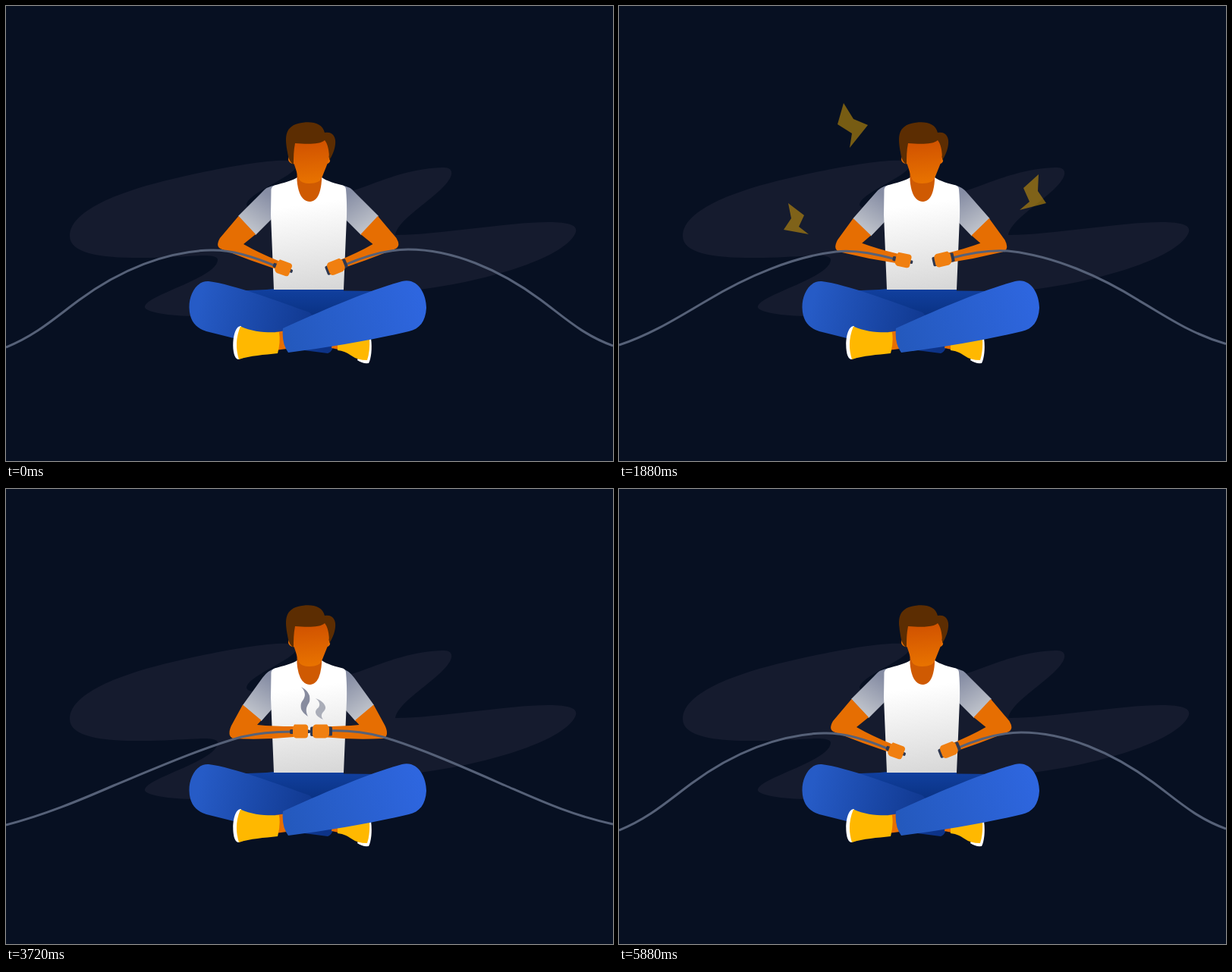
Recreate the animation shown at these times as an HTML page. Size 800 by 600 pixels, loop 6720 ms.

```html
<!DOCTYPE html>
<html lang="en">
<head>
<meta charset="utf-8">
<title>Connecting cables</title>
<style>
html, body { margin: 0; width: 100%; height: 100%; overflow: hidden; background: #071022; }
svg { display: block; width: 100vw; height: 100vh; }
.skin { fill: #e66e02; }
.fist { fill: #f07f10; }
.dark { fill: #2f3850; }
.gold { fill: #ffb800; }
.cable { fill: none; stroke: #566178; stroke-width: 3; }
</style>
</head>
<body>
<svg viewBox="0 0 800 600">
  <defs>
    <linearGradient id="shirt" gradientUnits="userSpaceOnUse" x1="392" y1="262" x2="408" y2="374">
      <stop stop-color="#fff"/><stop offset="1" stop-color="#d8d8d8"/>
    </linearGradient>
    <linearGradient id="sleeve" gradientUnits="userSpaceOnUse" x1="347" y1="248" x2="318" y2="292">
      <stop stop-color="#868da4"/><stop offset="1" stop-color="#bfc3cb"/>
    </linearGradient>
    <linearGradient id="face" gradientUnits="userSpaceOnUse" x1="400" y1="182" x2="404" y2="232">
      <stop stop-color="#d25400"/><stop offset="1" stop-color="#e87200"/>
    </linearGradient>
    <linearGradient id="hip" x2="0" y2="1">
      <stop stop-color="#11409f"/><stop offset="1" stop-color="#082e7c"/>
    </linearGradient>
    <linearGradient id="backLeg" gradientUnits="userSpaceOnUse" x1="255" y1="390" x2="425" y2="430">
      <stop stop-color="#265bc6"/><stop offset="1" stop-color="#0d3387"/>
    </linearGradient>
    <linearGradient id="frontLeg" gradientUnits="userSpaceOnUse" x1="370" y1="440" x2="545" y2="380">
      <stop stop-color="#2459bd"/><stop offset="1" stop-color="#2e66df"/>
    </linearGradient>
  </defs>

  <path fill="#151b2e" d="M84 303C84 270 150 244 220 228C290 211 374 197 383 207C390 222 318 245 317 262
    C318 276 400 262 465 241C500 228 535 214 575 213C588 212 590 220 584 229C570 252 516 280 513 302
    C570 302 660 285 715 285C745 285 753 290 751 298C740 330 640 362 545 374L420 405L245 409
    C205 408 181 402 183 396C187 380 280 358 279 334C276 325 240 331 190 332C130 333 84 328 84 303Z"/>

  <path fill="url(#sleeve)" data-pose="sleeve"/>
  <path fill="url(#sleeve)" data-pose="sleeve" transform="translate(797 0) scale(-1 1)"/>

  <path fill="url(#hip)" d="M304 375Q335 375 353 373H445V375.500L494 376L440 412L390 418Z"/>
  <path fill="url(#shirt)" d="M349.500 242Q350 238 354 236.500C366 233 376 231 384 226H416C423 231 434 234 444 236.500Q448 238 448 242
    Q449.500 258 449 278L445 374H353L349 275Z"/>
  <path fill="#cf5a02" d="M383.500 215V230Q386 258 401 258Q414 257 416 230V215Z"/>
  <path class="skin" d="M380 197Q372 195 372 203Q374 209 381 208ZM423 198Q428 200 427 205Q425 209 422 208Z"/>
  <path fill="url(#face)" d="M379 177H426Q428 192 424 207L416 227Q413 234 400 234Q389 234 386 228L379 206Z"/>
  <path fill="#5c2d02" d="M371 193C368 176 366 160 385 155C400 151 417 153 420 167C431 165 435 173 434 182
    C433 192 429 198 426 204C426 190 424 182 420 177C414 183 395 182 381 181C379 190 379 200 379 209C374 206 372 200 371 193Z"/>

  <path fill="url(#backLeg)" d="M267 363C250 362 241 382 241.500 398C242 417 252 425 264 429L300 438L378 452L424 458Q431 456 434 440L400 404
    C360 390 300 367 267 363Z"/>
  <path class="skin" d="M355 430L370 428V452L355 454ZM430 444L443 442V454L429 451Z"/>
  <path fill="#fff" d="M310 422C297 421 296 465 306 466L312 464ZM472 436L481 438C483 452 481 466 478 471Q470 472 463 467Z"/>
  <path class="gold" d="M309 422.500C325 430 345 431 360 430Q362 444 358 458C340 460 322 461 307 466Q300 444 309 422.500Z
    M437 444L479 438Q480 455 476 467Q463 467 455 461Q447 455 437 454Z"/>
  <path fill="url(#frontLeg)" d="M365 425C420 400 480 374 522 363C543 358 554 380 554 398C553 416 545 426 531 429
    Q460 446 372 457Q363 445 365 425Z"/>

  <path class="skin" data-pose="arm"/>
  <path class="skin" data-pose="arm" transform="translate(796.5 0) scale(-1 1)"/>
  <path class="cable" data-pose="cableL"/>
  <path class="cable" data-pose="cableR"/>

  <g id="handL">
    <rect class="dark" x="-14" y="-2.500" width="7" height="6" rx="1.500"/>
    <rect class="dark" x="7" y="-2" width="6" height="4.500" rx="1.500"/>
    <path class="fist" d="M-8 -9H7Q11 -8 10 -3V5Q10 9 6 9H-6Q-11 7 -10 3V-5Z"/>
  </g>
  <g id="handR">
    <rect class="dark" x="-14" y="-6" width="7" height="12.500" rx="2"/>
    <rect class="dark" x="9" y="-6" width="6" height="12" rx="1.500"/>
    <path class="fist" d="M8 -9H-7Q-11 -8 -11 -3V5Q-10 9 -6 9H6Q11 7 11 3V-5Z"/>
  </g>

  <path id="smokeL" fill="#888c9f" d="M389 261C399 266 404 276 398 284C395 289 395 294 398 300C390 295 385 287 391 279C396 272 394 266 389 261Z"/>
  <path id="smokeR" fill="#a5a8b4" d="M408 276C417 279 425 287 419 293C415 297 415 300 418 304C409 300 404 294 412 288C415 283 412 279 408 276Z"/>
  <path id="mouth" fill="#fff" d="M393 221A7.500 9 0 0 1 408.500 221Z"/>
  <path id="drop" fill="#f3eee6" d="M419 194C423 200 425 205 425 208A5.300 6 0 0 1 414.300 208C414.300 204 417 199 419 194Z"/>
  <path id="bolts" class="gold" d="M296 128L309 149L328 157L304 187L307 168L288 156Z
    M223 260L244 276L237 291L250 301L217 295L227 280Z
    M553 222L552 244L563 260L528 269L541 258L533 240Z"/>
</svg>
<script>
const LOOP = 6720, STEP = 40;
const $ = id => document.getElementById(id);
const lerp = (a, b, k) => a + (b - a) * k;
const ramp = (t, a, b) => Math.min(1, Math.max(0, (t - a) / (b - a)));
const ease = k => k < .5 ? 4 * k ** 3 : 1 - (2 - 2 * k) ** 3 / 2;

// Each shape: hands apart, hands together.
const poses = {
  arm: [
    'M306.5 277L282 306Q275 318 285 321Q320 335 356 347L359 336Q332 325 313 314L329 301Z',
    'M312 284.5L297 312Q291 325 299 329Q340 331 379 327L380 313Q352 313 331 311L336.5 305Z'],
  sleeve: [
    'M356 236Q343 238 337 246L306 277L329 302L356 275Z',
    'M356 236Q345 239 338 249L312 285L336.5 306L356 284Z'],
  cableL: [
    'M0 450C40 434 66 410 96 388C150 348 212 323 270 322C300 321 335 334 358 344',
    'M0 443C50 430 96 411 142 391C200 367 260 341 310 327C335 321 355 320 378 320'],
  cableR: [
    'M445 342C470 331 502 321 530 321C588 321 650 347 704 387C734 409 760 434 800 448',
    'M424 319C450 318 475 321 497 327C550 343 610 370 658 391C704 411 745 430 800 442']
};
const number = /\d+(\.\d+)?/g;

function morph([from, to], k) {
  const ends = to.match(number);
  let i = 0;
  return from.replace(number, n => lerp(+n, +ends[i++], k).toFixed(2));
}

function place(id, [x, y, r], [x2, y2], k) {
  $(id).setAttribute('transform', `translate(${lerp(x, x2, k)} ${lerp(y, y2, k)}) rotate(${r * (1 - k)})`);
}

function smoke(id, t, start, end) {
  const s = $(id).style;
  s.opacity = t < end ? ramp(t, start, start + 180) : 0;
  s.clipPath = `inset(0 0 ${100 * ramp(t, 3860, end)}% 0)`;
}

function draw(t) {
  const move = (a, b) => ease(ramp(t, a, b));
  const k = move(0, 420) - move(1655, 2075) + move(2725, 3145) - move(5455, 5875);
  for (const el of document.querySelectorAll('[data-pose]'))
    el.setAttribute('d', morph(poses[el.dataset.pose], k));
  place('handL', [365.5, 345.5, 20], [388, 319.5], k);
  place('handR', [435, 344, -22], [415, 319.5], k);

  $('bolts').style.opacity = ramp(t, 410, 1080) - ramp(t, 1650, 2070);
  smoke('smokeL', t, 3530, 4840);
  smoke('smokeR', t, 3550, 4980);

  const leave = ramp(t, 5100, 5280);
  $('mouth').style.opacity = ramp(t, 3780, 4100) - leave;
  $('drop').style.opacity = ramp(t, 3780, 4000) - leave;
  $('drop').setAttribute('transform', `translate(0 ${-14 * (1 - move(3760, 4640))})`);
}

const start = performance.now();
function frame() {
  const t = (performance.now() - start) % LOOP;
  draw(Math.floor(t / STEP) * STEP);
  requestAnimationFrame(frame);
}
frame();
</script>
</body>
</html>
```
